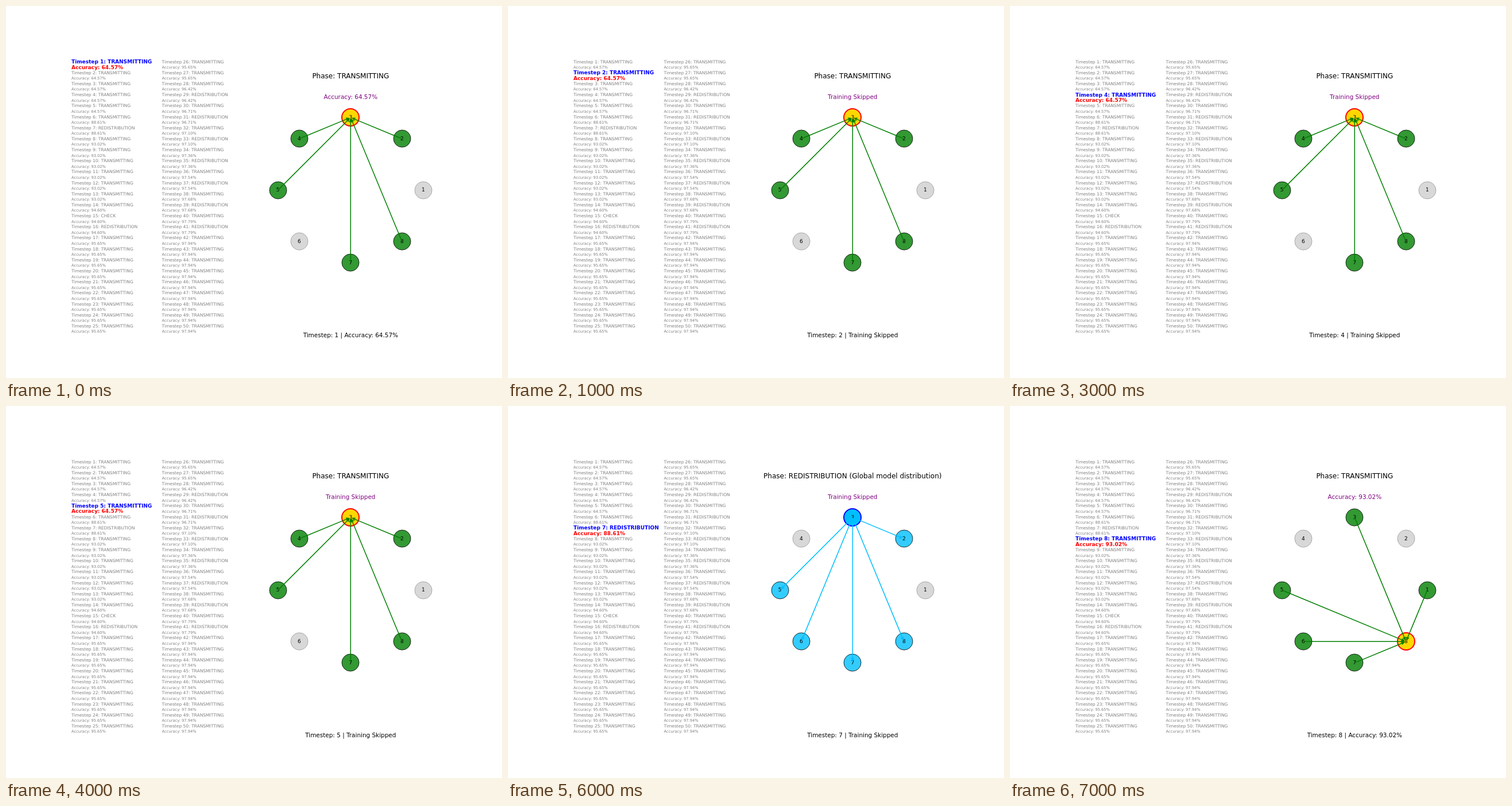
Write an HTML page with a canvas that moves like this. It is 864 by 648 pixels and loops after 8 s.

```html
<!DOCTYPE html>
<html lang="en">
<head>
<meta charset="utf-8">
<title>Transmission phases</title>
<style>
  html, body { margin: 0; width: 100%; height: 100%; overflow: hidden; background: #fff; }
  canvas { display: block; }
</style>
</head>
<body>
<canvas id="stage" width="864" height="648"></canvas>
<script>
const ctx = document.getElementById('stage').getContext('2d');
const STEP_MS = 1000, STEPS = 8, ROWS = 25;
const CENTER = { x: 600.3, y: 320.76 }, RING = 126.6, NODE_R = 15;

// [first timestep, accuracy from then on]
const accuracySteps = [
  [1, 64.57], [6, 88.61], [8, 93.02], [14, 94.6], [17, 95.65], [28, 96.42], [30, 96.71],
  [32, 97.1], [34, 97.36], [36, 97.54], [38, 97.68], [40, 97.79], [42, 97.94]
];
const redistributions = [7, 16, 29, 31, 33, 35, 37, 39, 41];

const accuracyText = step =>
  `Accuracy: ${accuracySteps.filter(([first]) => first <= step).pop()[1].toFixed(2)}%`;
const phaseOf = step => step === 15 ? 'CHECK'
  : redistributions.includes(step) ? 'REDISTRIBUTION' : 'TRANSMITTING';

function networkAt(step) {
  if (step === 8) return { hub: 8, peers: [1, 3, 5, 6, 7] };
  if (step === 7) return { hub: 3, peers: [2, 5, 6, 7, 8], sending: true };
  return { hub: 3, peers: step === 6 ? [2, 4, 5, 6, 7, 8] : [2, 4, 5, 7, 8] };
}

function position(id) {
  const angle = (id - 1) * Math.PI / 4;
  return { x: CENTER.x + RING * Math.cos(angle), y: CENTER.y - RING * Math.sin(angle) };
}

function text(str, x, y, size, color, { align = 'left', bold = false } = {}) {
  ctx.font = `${bold ? 'bold ' : ''}${size}px "DejaVu Sans", sans-serif`;
  ctx.textAlign = align;
  ctx.fillStyle = color;
  ctx.fillText(str, x, y);
}

function drawList(current) {
  for (let step = 1; step <= 2 * ROWS; step++) {
    const row = (step - 1) % ROWS;
    const bold = step === current;
    const x = step > ROWS ? 271.6 : 114;
    const y = (bold ? 100 : 99.6) + row * 19.18;
    text(`Timestep ${step}: ${phaseOf(step)}`, x, Math.round(y),
      bold ? 9 : 7.5, bold ? '#00f' : '#808080', { bold });
    text(accuracyText(step), x, Math.round(y + 9.5),
      bold ? 9 : 6.7, bold ? '#f00' : '#808080', { bold });
  }
}

// Nodes sit on whole pixels, arrows do not.
function drawNode(id, fill, edge, width) {
  const { x, y } = position(id);
  ctx.beginPath();
  ctx.arc(Math.round(x), Math.round(y), NODE_R, 0, 2 * Math.PI);
  ctx.fillStyle = fill;
  ctx.fill();
  ctx.strokeStyle = edge;
  ctx.lineWidth = width;
  ctx.stroke();
  text(id, x, Math.floor(y + 3), 9, '#000', { align: 'center' });
}

function drawArrow(from, to, color) {
  const a = position(from), b = position(to);
  const length = Math.hypot(b.x - a.x, b.y - a.y), tip = length - 3.7;
  ctx.save();
  ctx.translate(a.x, a.y);
  ctx.rotate(Math.atan2(b.y - a.y, b.x - a.x));
  ctx.beginPath();
  ctx.moveTo(2, 0);
  ctx.lineTo(tip, 0);
  ctx.moveTo(tip - 4, -2);
  ctx.lineTo(tip, 0);
  ctx.lineTo(tip - 4, 2);
  ctx.strokeStyle = color;
  ctx.lineWidth = 1.5;
  ctx.lineCap = ctx.lineJoin = 'round';
  ctx.stroke();
  ctx.restore();
}

function drawNetwork(step) {
  const { hub, peers, sending } = networkAt(step);
  for (let id = 1; id <= 8; id++) {
    if (id === hub) drawNode(id, sending ? '#00bfff' : '#ffd700', sending ? '#00f' : '#f00', 2);
    else if (peers.includes(id)) drawNode(id, sending ? '#33ccff' : '#339933', 'rgba(0,0,0,.8)', 1);
    else drawNode(id, '#d8d8d8', '#a9a9a9', 1);
  }
  for (const peer of peers) {
    if (sending) drawArrow(hub, peer, '#00bfff');
    else drawArrow(peer, hub, '#008000');
  }
}

function draw(step) {
  const phase = phaseOf(step);
  const detail = phase === 'REDISTRIBUTION' ? ' (Global model distribution)' : '';
  const status = [1, 6, 8].includes(step) ? accuracyText(step) : 'Training Skipped';
  const centered = { align: 'center' };
  ctx.fillStyle = '#fff';
  ctx.fillRect(0, 0, 864, 648);
  drawList(step);
  drawNetwork(step);
  text(`Phase: ${phase}${detail}`, CENTER.x, 126, 12, '#000', centered);
  text(status, CENTER.x, 162, 10.45, '#800080', centered);
  text(`Timestep: ${step} | ${status}`, CENTER.x, 577, 10.45, '#000', centered);
}

const start = performance.now();
function tick() {
  const elapsed = performance.now() - start;
  draw(Math.floor(elapsed / STEP_MS) % STEPS + 1);
  requestAnimationFrame(tick);
}
tick();
</script>
</body>
</html>
```
